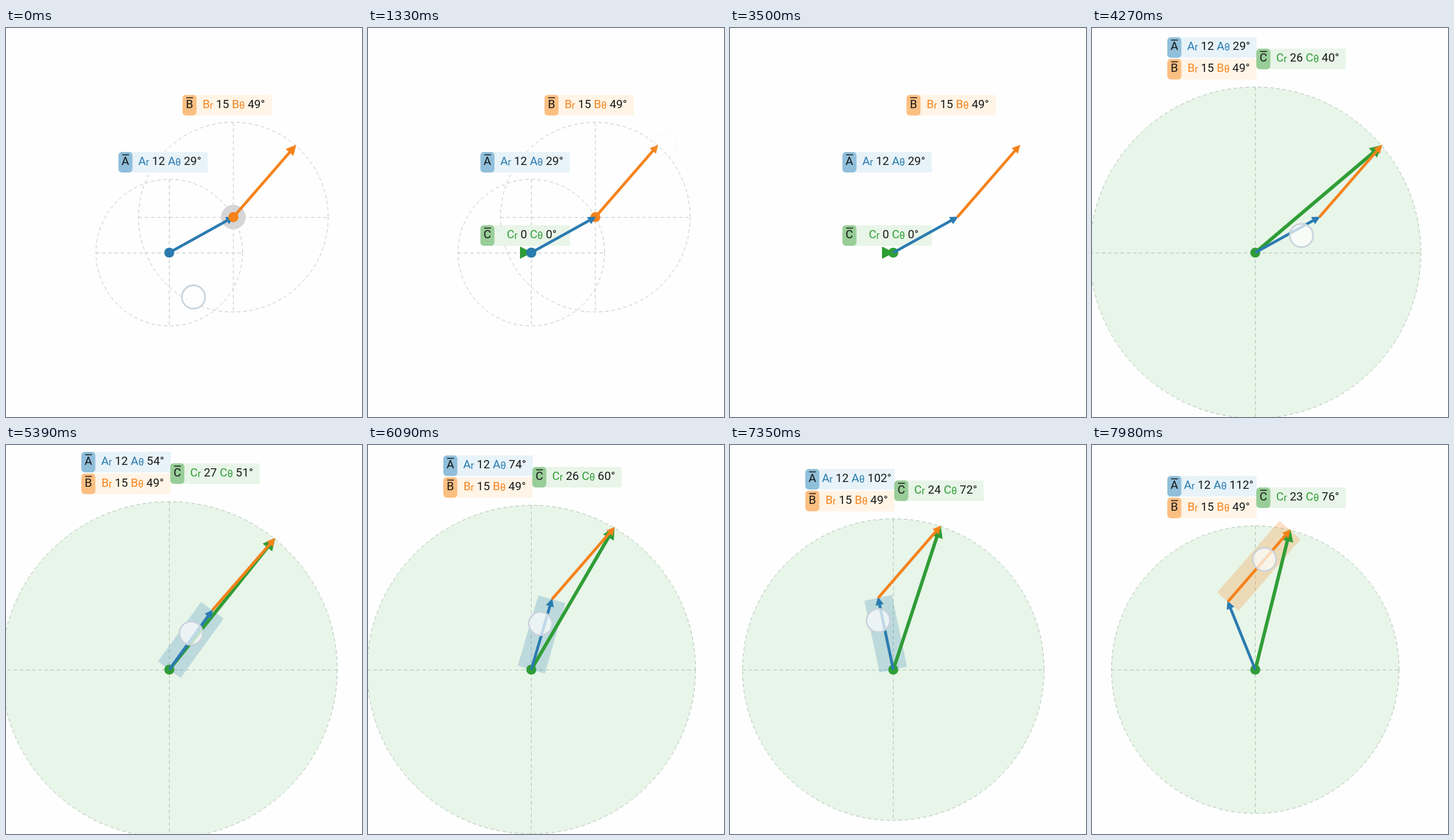
Animation, 520 px wide and 568 px high, one loop 8 s. Source, as an HTML page with a canvas:

```html
<!DOCTYPE html>
<html lang="en">
<head>
<meta charset="utf-8">
<title>Vector addition</title>
<style>
  html, body { margin: 0; width: 100%; height: 100%; overflow: hidden; background: #fefefe; }
  canvas { display: block; }
</style>
</head>
<body>
<canvas id="stage" width="520" height="568"></canvas>
<script>
const ctx = document.getElementById('stage').getContext('2d');
const LOOP = 8000, TAU = Math.PI * 2, UNIT = 9.2;
const O = { x: 238.5, y: 328 };
const A = { name: 'A', color: '#2a7bb0', handle: '#90bfdb', back: '#e7f3f8' };
const B = { name: 'B', color: '#f5821a', handle: '#fcbf82', back: '#fff4e6' };
const C = { name: 'C', color: '#2f9d36', handle: '#98cd98', back: '#e8f5e8' };
const LEN_A = 107, LEN_B = 138.5, ANGLE_B = 49;

const mix = (a, b, p) => a + (b - a) * p;
const mixPoint = (a, b, p) => ({ x: mix(a.x, b.x, p), y: mix(a.y, b.y, p) });
const ease = p => p * p * (3 - 2 * p);
const polar = (p, r, deg) => ({
  x: p.x + r * Math.cos(deg * TAU / 360),
  y: p.y - r * Math.sin(deg * TAU / 360)
});

// Linear interpolation through time/value pairs
function track(t, ...keys) {
  if (t <= keys[0][0]) return keys[0][1];
  for (let i = 1; i < keys.length; i++) {
    const [t0, v0] = keys[i - 1], [t1, v1] = keys[i];
    if (t < t1) return mix(v0, v1, (t - t0) / (t1 - t0));
  }
  return keys[keys.length - 1][1];
}

function withAlpha(alpha, draw) {
  if (alpha <= 0) return;
  ctx.save();
  ctx.globalAlpha = alpha;
  draw();
  ctx.restore();
}

function disc(p, r, fill) {
  ctx.beginPath();
  ctx.arc(p.x, p.y, r, 0, TAU);
  ctx.fillStyle = fill;
  ctx.fill();
}

function dial(p, r, stroke, fill) {
  if (fill) disc(p, r, fill);
  ctx.save();
  ctx.setLineDash([5, 4]);
  ctx.strokeStyle = stroke;
  ctx.lineWidth = 1;
  ctx.beginPath();
  ctx.arc(p.x, p.y, r, 0, TAU);
  ctx.moveTo(p.x - r, p.y + .5);
  ctx.lineTo(p.x + r, p.y + .5);
  ctx.moveTo(p.x, p.y - r);
  ctx.lineTo(p.x, p.y + r);
  ctx.stroke();
  ctx.restore();
}

// The head reaches slightly past the end of the vector
function arrow(p, r, deg, color, width, head) {
  const tip = r + 1.5;
  ctx.save();
  ctx.translate(p.x, p.y);
  ctx.rotate(-deg * TAU / 360);
  ctx.fillStyle = color;
  ctx.fillRect(0, -width / 2, Math.max(0, tip - head + 2), width);
  ctx.beginPath();
  ctx.moveTo(tip, 0);
  ctx.lineTo(tip - head, -head * .5);
  ctx.lineTo(tip - head, head * .5);
  ctx.fill();
  ctx.restore();
}

function band(p, r, deg, color) {
  ctx.save();
  ctx.translate(p.x, p.y);
  ctx.rotate(-deg * TAU / 360);
  ctx.fillStyle = color;
  ctx.fillRect(0, -20.5, r, 41);
  ctx.restore();
}

function label(v, pos, r, deg) {
  const { x, y } = pos, ink = '#161616', baseline = y + 19;
  ctx.fillStyle = v.back;
  ctx.fillRect(x + 10, y, 120.5, 30);
  ctx.fillStyle = v.handle;
  ctx.beginPath();
  ctx.roundRect(x, y, 20.5, 30, 5);
  ctx.fill();

  const big = '17px Roboto, sans-serif', small = '14px Roboto, sans-serif';
  const parts = [
    [v.name, big, v.color], ['r', small, v.color], [` ${Math.round(r / UNIT)} `, big, ink],
    [v.name, big, v.color], ['θ', small, v.color], [` ${Math.round(deg)}°`, big, ink]
  ];
  const width = ([text, font]) => {
    ctx.font = font;
    return ctx.measureText(text).width;
  };
  let left = x + 75 - parts.reduce((sum, part) => sum + width(part), 0) / 2;
  for (const part of parts) {
    const w = width(part);
    ctx.fillStyle = part[2];
    ctx.fillText(part[0], left, baseline + (part[1] === small ? 1 : 0));
    left += w;
  }

  ctx.font = big;
  ctx.fillStyle = ink;
  ctx.textAlign = 'center';
  ctx.fillText(v.name, x + 10.2, baseline);
  ctx.textAlign = 'left';
  ctx.fillRect(x + 5.5, y + 3.5, 10, 1.3);
}

function touchPoint(t, angle) {
  if (t < 3000) {
    return {
      x: track(t, [0, 274], [350, 242], [450, 242], [1100, 435]),
      y: track(t, [0, 393], [350, 330], [450, 330], [1100, 170])
    };
  }
  const lead = track(t, [3900, -20], [4270, -8.7], [4500, 5]);
  const r = track(t, [3900, 95], [4270, 72], [4500, 62], [5390, 62], [6790, 75]);
  return mixPoint(polar(O, r, angle + lead), { x: 252, y: 167 },
    ease(track(t, [7770, 0], [7960, 1])));
}

function draw(t) {
  const angle = track(t, [4550, 29], [5040, 36], [5390, 54], [5880, 69],
    [6720, 87.5], [6790, 95], [7560, 104.5], [7770, 112]);
  const tipA = polar(O, LEN_A, angle), tipB = polar(tipA, LEN_B, ANGLE_B);
  const grow = ease(track(t, [3750, 0], [4130, 1]));
  const sumX = tipB.x - O.x, sumY = O.y - tipB.y;
  const lenC = Math.hypot(sumX, sumY) * grow;
  const angleC = grow ? Math.atan2(sumY, sumX) * 360 / TAU : 0;
  const dials = track(t, [1500, 1], [2300, 0]);
  const showC = track(t, [1050, 0], [1300, 1]);
  const active = track(t, [0, 1], [280, 0]);

  ctx.fillStyle = '#fefefe';
  ctx.fillRect(0, 0, 520, 568);

  withAlpha(dials, () => {
    dial(O, LEN_A, '#c6c8ca');
    dial(tipA, LEN_B, '#c6c8ca');
  });
  if (grow) withAlpha(Math.min(1, grow * 3), () => dial(O, lenC, '#b3c5b4', '#e8f5e9'));

  const above = (p, r) => ({ x: p.x - 74.3, y: p.y - r - 40 });
  const bottom = O.y - lenC - 10;
  label(A, mixPoint(above(O, LEN_A), { x: 110, y: bottom - 62.7 }, grow), LEN_A, angle);
  label(B, mixPoint(above(tipA, LEN_B), { x: 110, y: bottom - 31 }, grow), LEN_B, ANGLE_B);
  withAlpha(showC, () => label(C,
    mixPoint(above(O, 0), { x: 240, y: bottom - 46 }, grow), lenC, angleC));

  withAlpha(track(t, [4400, 0], [4500, .23], [7700, .23], [7770, 0]),
    () => band(O, LEN_A, angle, A.color));
  withAlpha(track(t, [7880, 0], [7960, .24]),
    () => band(tipA, LEN_B, ANGLE_B, B.color));
  withAlpha(active, () => disc(tipA, 18, '#d6d6d6'));

  withAlpha(showC, () => arrow(O, lenC, angleC, C.color, 5, 18));
  withAlpha(showC, () => disc(O, 7.3, C.color));
  withAlpha(dials, () => {
    disc(O, 7.3, A.color);
    disc(tipA, 7.3, B.color);
  });
  arrow(O, LEN_A, angle, A.color, 4.1, 12);
  withAlpha(active, () => disc(tipA, 7.3, B.color));
  arrow(tipA, LEN_B, ANGLE_B, B.color, 4.1, 12 + 3 * active);

  withAlpha(track(t, [1120, 1], [1350, 0], [3900, 0], [4150, 1]), () => {
    const p = touchPoint(t, angle);
    disc(p, 17, 'rgba(255,255,255,.7)');
    ctx.strokeStyle = '#c9d3dc';
    ctx.lineWidth = 2.4;
    ctx.stroke();
  });
}

function frame(now) {
  draw(now % LOOP);
  requestAnimationFrame(frame);
}
requestAnimationFrame(frame);
</script>
</body>
</html>
```
